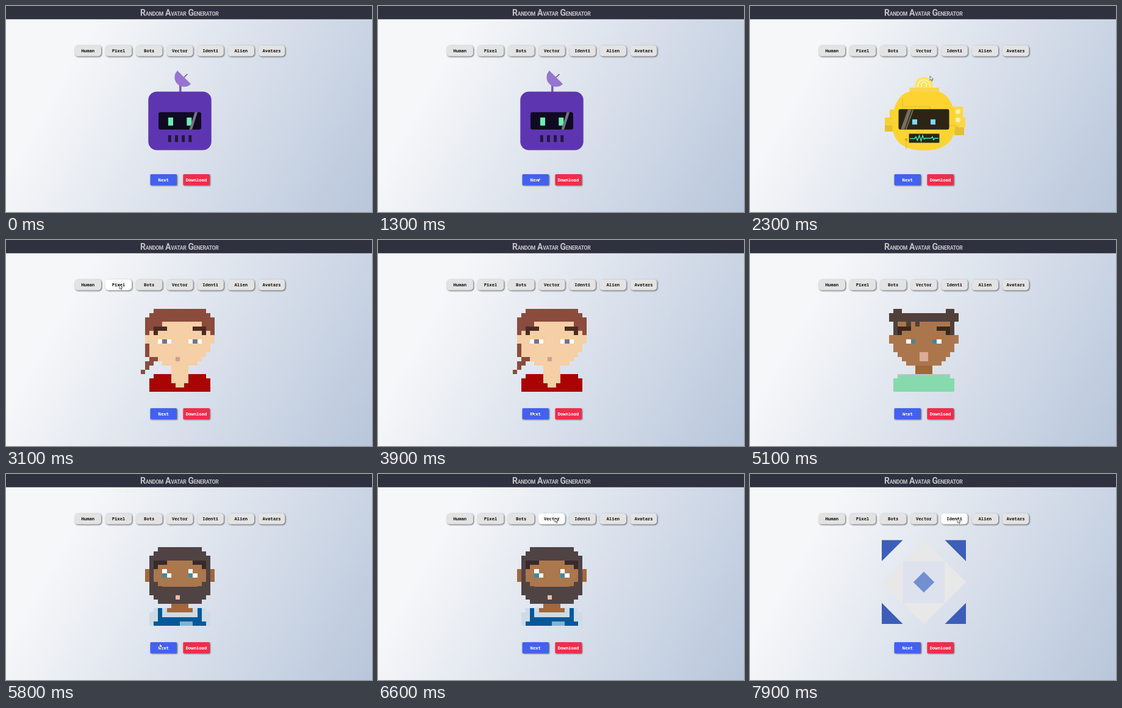
Recreate the animation shown at these times as an HTML page. Size 600 by 338 pixels, loop 8 s.

```html
<!DOCTYPE html>
<html lang="en">
<head>
<meta charset="utf-8">
<title>Random Avatar Generator</title>
<style>
  html, body { margin: 0; width: 100%; height: 100%; overflow: hidden; }
  body { background: linear-gradient(120deg, #f6f7f9 20%, #b8c6db); }
  svg { display: block; width: 100vw; height: 100vh; }

  .title { font: 700 8.6px Roboto, sans-serif; letter-spacing: -.3px; fill: #c3c4c9; }
  .title .cap { font-size: 14px; }
  .label { font: 700 7.2px "Noto Sans Mono", "DejaVu Sans Mono", monospace; text-anchor: middle; fill: #111; }
  .light { fill: #fff; }
  .btn { fill: #e3e3e4; filter: drop-shadow(1px 1px 1px rgba(0, 0, 0, .6)); }
  .next { fill: #4361ee; }
  .download { fill: #ef2d4b; }
  .pixels { transform: translate(213.5px, 105.8px) scale(7.15); shape-rendering: crispEdges; }

  /* Avatars and hover states switch hard */
  .avatar, .hover { animation: 8s step-end infinite; }
  .avatar { visibility: hidden; }
  .violet { animation-name: violet; }
  .yellow { animation-name: yellow; }
  .girl { animation-name: girl; }
  .kid { animation-name: kid; }
  .man { animation-name: man; }
  .identi { animation-name: identi; }
  @keyframes violet { 0% { visibility: visible } 20%, 100% { visibility: hidden } }
  @keyframes yellow { 0% { visibility: hidden } 20% { visibility: visible } 33.75%, 100% { visibility: hidden } }
  @keyframes girl { 0% { visibility: hidden } 33.75% { visibility: visible } 56.25%, 100% { visibility: hidden } }
  @keyframes kid { 0% { visibility: hidden } 56.25% { visibility: visible } 71.25%, 100% { visibility: hidden } }
  @keyframes man { 0% { visibility: hidden } 71.25% { visibility: visible } 92.5%, 100% { visibility: hidden } }
  @keyframes identi { 0% { visibility: hidden } 92.5%, 100% { visibility: visible } }

  .on-human { animation-name: on-human; }
  .on-pixel { animation-name: on-pixel; }
  .on-vector { animation-name: on-vector; }
  .on-identi { animation-name: on-identi; }
  @keyframes on-human { 0% { fill: #e3e3e4 } 31.9% { fill: #fff } 36.2%, 100% { fill: #e3e3e4 } }
  @keyframes on-pixel { 0% { fill: #e3e3e4 } 36.3% { fill: #fff } 41.2%, 100% { fill: #e3e3e4 } }
  @keyframes on-vector { 0% { fill: #e3e3e4 } 77.8% { fill: #fff } 87.2%, 100% { fill: #e3e3e4 } }
  @keyframes on-identi { 0% { fill: #e3e3e4 } 87.5%, 100% { fill: #fff } }

  .cursor { animation: move 8s ease-in-out infinite, appear 8s step-end infinite; }
  @keyframes appear { 0% { visibility: hidden } 5%, 100% { visibility: visible } }
  @keyframes move {
    0%, 5% { transform: translate(300px, 230px) }
    11.25%, 23.75% { transform: translate(261px, 282px); animation-timing-function: ease-in }
    28.75% { transform: translate(296px, 115px); animation-timing-function: ease-out }
    32.5%, 35.6% { transform: translate(138px, 73px) }
    37.5%, 40.6% { transform: translate(186px, 73px) }
    45% { transform: translate(232px, 235px); animation-timing-function: ease-out }
    47%, 61.25% { transform: translate(253px, 281px) }
    63.75%, 71.9% { transform: translate(251px, 282px) }
    78.1% { transform: translate(287px, 74px) }
    82.5%, 85.6% { transform: translate(290px, 72px) }
    89.4% { transform: translate(336px, 73px) }
    97%, 100% { transform: translate(340px, 73px) }
  }
</style>
</head>
<body>
<svg viewBox="0 0 600 338" preserveAspectRatio="none">
  <path fill="#2f313f" d="M0 0h600v21.7H0z"/>
  <text class="title" x="220" y="16"><tspan class="cap">R</tspan>ANDOM <tspan class="cap" dx="1.2">A</tspan>VATAR <tspan class="cap" dx="1.2">G</tspan>ENERATOR</text>

  <g>
    <rect class="btn hover on-human" x="112.5" y="64.5" width="43.6" height="18" rx="5"/>
    <rect class="btn hover on-pixel" x="162.7" y="64.5" width="43.6" height="18" rx="5"/>
    <rect class="btn" x="212.9" y="64.5" width="43.6" height="18" rx="5"/>
    <rect class="btn hover on-vector" x="263.1" y="64.5" width="43.6" height="18" rx="5"/>
    <rect class="btn hover on-identi" x="313.3" y="64.5" width="43.6" height="18" rx="5"/>
    <rect class="btn" x="363.5" y="64.5" width="43.6" height="18" rx="5"/>
    <rect class="btn" x="413.7" y="64.5" width="43.6" height="18" rx="5"/>
    <rect class="btn next" x="236.5" y="276" width="43.5" height="18" rx="1.5"/>
    <rect class="btn download" x="290.4" y="276" width="43.5" height="18" rx="1.5"/>
  </g>
  <g class="label">
    <text x="134.3" y="76">Human</text>
    <text x="184.5" y="76">Pixel</text>
    <text x="234.7" y="76">Bots</text>
    <text x="284.9" y="76">Vector</text>
    <text x="335.1" y="76">Identi</text>
    <text x="385.3" y="76">Alien</text>
    <text x="435.5" y="76">Avatars</text>
    <text class="light" x="258.2" y="287.7">Next</text>
    <text class="light" x="312" y="287.7">Download</text>
  </g>

  <g class="avatar violet">
    <path fill="#7e57c2" d="M284 128h3.6v13h-3.6z"/>
    <path fill="#9575cd" d="M281 106l22 22A15.5 15.5 0 0 1 281 106z"/>
    <path stroke="#6a3fb5" stroke-width="1.5" d="M292 117l6-6"/>
    <circle cx="299" cy="109.5" r="2.6" fill="#e9e6f4"/>
    <rect x="233.3" y="140.5" width="103.4" height="96" rx="14" fill="#5e35b1"/>
    <rect x="250" y="174.3" width="70" height="28.5" rx="3" fill="#0f0a22"/>
    <path fill="#69f0ae" d="M266 183h8v13.3h-8zM296.3 183h8v13.3h-8z"/>
    <path fill="#757282" d="M309.5 174.3h4.5l-9 28.5h-4.5z"/>
    <path fill="#23163f" d="M265.8 212h5v11.3h-5zM277 212h5v11.3h-5zM288.1 212h5v11.3h-5zM299.3 212h5v11.3h-5z"/>
  </g>

  <g class="avatar yellow">
    <path fill="#ffe35c" d="M270.5 134v-3a14.5 14.5 0 0 1 29 0v3z"/>
    <path fill="none" stroke="#fff3b0" stroke-width="2" d="M275 133v-2a10 10 0 0 1 20 0v2M281 133v-4a4 4 0 0 1 8 0v4"/>
    <path fill="#f9d54f" d="M261.5 134h48.5v9h-48.5z"/>
    <path fill="#f7d038" d="M221 183h8v-13h10v36h-18z"/>
    <path fill="#e5bf31" d="M221 196h13v10h-13zM335 196h16v16h-16z"/>
    <path fill="#fbd744" d="M328 165h21v32h-21zM341 183h12v16h-12z"/>
    <g fill="#fff0a5"><circle cx="341" cy="173.3" r="4"/><circle cx="341" cy="187" r="4"/></g>
    <path fill="#fdd42f" d="M265 140.5h40c20 0 32 25 32 52 0 29-18 44.5-52 44.5s-52-15.5-52-44.5c0-27 12-52 32-52z"/>
    <path fill="none" stroke="#c4a026" stroke-width="1.2" stroke-dasharray="1 1" d="M250 151v14h45v4M256 235v-14h5M326 196h11"/>
    <circle cx="256" cy="219" r="2" fill="#c4a026"/>
    <rect x="243.5" y="169.3" width="83" height="33.5" rx="3" fill="#2c2515"/>
    <path fill="#77705f" d="M259 169.3h6l-12 33.5h-6zM266.5 169.3h2l-12 33.5h-2z"/>
    <path fill="#80d8ff" d="M266 186h8v8.5h-8zM296 186h8v8.5h-8z"/>
    <rect x="260.5" y="209.5" width="50" height="15" rx="1" fill="#2c2515" stroke="#b89528" stroke-dasharray="1 1"/>
    <path fill="none" stroke="#3ee5b2" stroke-width="1.5" d="M262 217.5h8l2-3 2.5 6 3-8 3 9 2.5-9 2.5 6 1.5-1.5h10l2-2.5 2 5 2-2.5h6"/>
  </g>

  <g class="avatar girl"><g class="pixels">
    <path fill="#f5cfa5" d="M3 4h14v3h1v2h-1v2h-1v1h-1v1h-1v1h-2v2h-4v-2h-2v-1H5v-1H3V9H2V7h1zM8 16h4v2h-1v1H9v-1H8z"/>
    <path fill="#8b4b3d" d="M4 1h12v1h1v1h1v4h-1V6h-1V5h-1V4H6v1H4v1H3v1H2V3h1V2h1zM2 9h1v3h2v1H4v1H3v1H2v1H1v-1h1v-2h1v-1H2z"/>
    <path fill="#4b2c24" d="M4 5h3v1H5v1H4zM13 5h3v2h-1V6h-2z"/>
    <path fill="#fff" d="M5 8h3v1H5zM12 8h3v1h-3z"/>
    <path fill="#6f7588" d="M6 8h1v1H6zM13 8h1v1h-1z"/>
    <path fill="#cba28f" d="M9 12h1v1H9z"/>
    <path fill="#a90303" d="M4 16h4v2h1v1h2v-1h1v-2h4v1h1v3H3v-3h1z"/>
  </g></g>

  <g class="avatar kid"><g class="pixels">
    <path fill="#ab764c" d="M3 4h14v3h1v2h-1v2h-1v1h-1v1h-1v1H6v-1H5v-1H4v-1H3V9H2V7h1z"/>
    <path fill="#a0673a" d="M8 14h4v2H8z"/>
    <path fill="#51403a" d="M3 1h2v1h10V1h2v1h1v2h-1v3h-1V4H9v1H8V4H7v1H6V4H4v3H3V4H2V2h1z"/>
    <path fill="#38281f" d="M4 5h3v1H5v1H4zM13 5h3v2h-1V6h-2z"/>
    <path fill="#fff" d="M6 8h1v1H6zM13 8h1v1h-1z"/>
    <path fill="#4a8595" d="M7 8h1v1H7zM12 8h1v1h-1z"/>
    <path fill="#dbab98" d="M9 11h2v2H9z"/>
    <path fill="#87d9ae" d="M4 16h12v1h1v3H3v-3h1z"/>
    <path fill="#b4c8c7" d="M4 16h12v.2H4z"/>
  </g></g>

  <g class="avatar man"><g class="pixels">
    <path fill="#a0683c" d="M2 7h1v3H2zM17 7h1v3h-1zM8 15h4v1h1v1H7v-1h1z"/>
    <path fill="#504344" d="M5 2h10v1h1v1h1v9h-1v1h-1v1H5v-1H4v-1H3V4h1V3h1z"/>
    <path fill="#ab774d" d="M7 5h6v1h3v4h-1v1h-1v.1H6V11H5v-1H4V6h3z"/>
    <path fill="#38292a" d="M4 5h3v1H5v1H4zM13 5h3v2h-1V6h-2z"/>
    <path fill="#fff" d="M6 7h1v1h1v1H6zM12 7h1v1h1v1h-2z"/>
    <path fill="#3f8ba0" d="M6 8h1v1H6zM12 8h1v1h-1z"/>
    <path fill="#edbcaa" d="M9 13h1v1H9z"/>
    <path fill="#cddce7" d="M4 16h3v1h6v-1h3v1h1v3H3v-3h1z"/>
    <path fill="#02599a" d="M5 16h1v2h8v-2h1v3h1v1H4v-1h1z"/>
    <path fill="#82b3ce" d="M10 19h3v1h-3z"/>
  </g></g>

  <g class="avatar identi">
    <path fill="#e8e8e8" d="M285 108.5l69 69-69 69-69-69z"/>
    <path fill="#dde2ee" d="M250.8 143h68.4v69h-68.4z"/>
    <path fill="#3c5eb9" d="M216 108.5h34.5L216 143zM354 108.5V143l-34.5-34.5zM216 246v-34.5l34.5 34.5zM354 246h-34.5l34.5-34.5z"/>
    <path fill="#718fd1" d="M285 160.2l17.2 17.2-17.2 17.2-17.2-17.2z"/>
  </g>

  <path class="cursor" d="M0 0v7.2l1.7-1.5 1.2 2.7 1.2-.5-1.1-2.6h2.2z" fill="#fff" stroke="#333" stroke-width=".7"/>
</svg>
</body>
</html>
```
